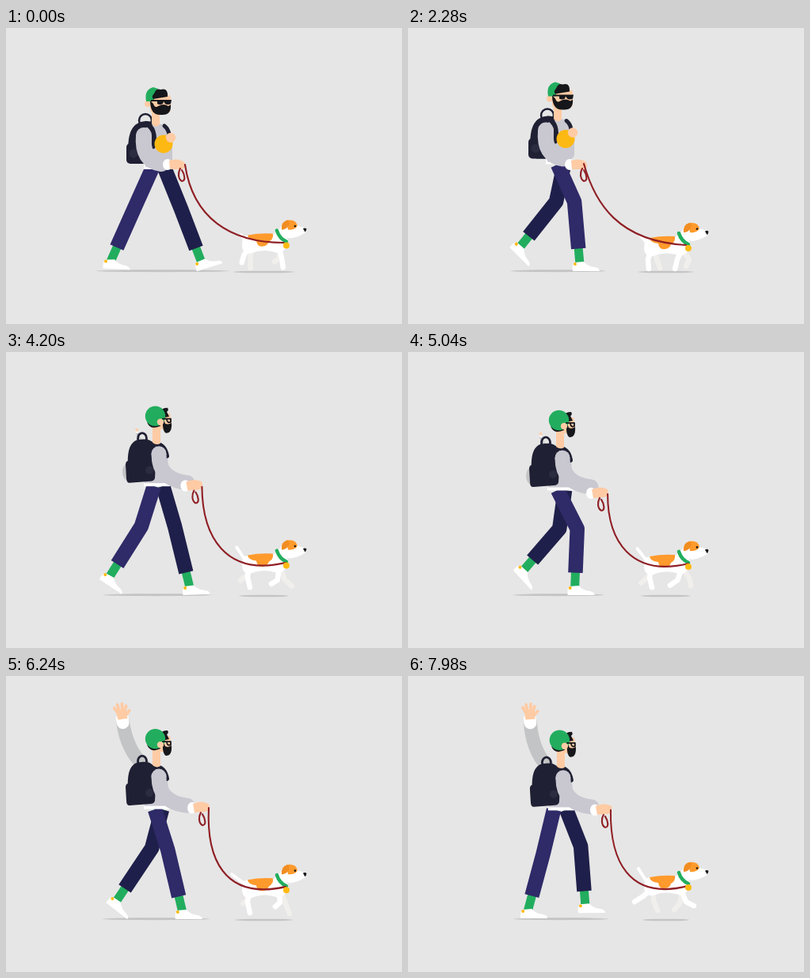
Recreate the animation shown at these times as an HTML page without scripts. Size 500 by 375 pixels, loop 8000 ms.

```html
<!DOCTYPE html>
<html lang="en">
<head>
<meta charset="utf-8">
<title>Walking the dog</title>
<style>
html, body { margin: 0; width: 100%; height: 100%; overflow: hidden; background: #e6e6e6; }
svg { display: block; width: 100%; height: 100%; }
.line { fill: none; stroke-linecap: round; stroke-linejoin: round; }
.sock { fill: none; stroke: #22ad5e; stroke-width: 11; }
.pants { fill: none; stroke-width: 18.5; stroke-linejoin: round; stroke-dasharray: .85 2; }
.leash { stroke: #8f1f25; stroke-width: 2.1; }
.paw { stroke: #fff; stroke-width: 6.5; }
.far { stroke: #f1efec; }
.skin { fill: #ffcba4; }
.dark { fill: #1f2033; }
.black { fill: #16171b; }
.green { fill: #22ad5e; }
.grey { fill: #c9c8d1; }
.sleeve { stroke: #c9c8d1; }
.strap { stroke: #1f2033; }
.orange { fill: #ff9a2c; }
.gold { fill: #fdb913; }
.white { fill: #fff; }
</style>
</head>
<body>
<svg viewBox="0 0 500 375">
<!-- master clock: every cycle restarts with it -->
<animate id="loop" attributeName="visibility" values="visible;visible" dur="8s" begin="0s;loop.end"/>
<defs>
  <path id="near" pathLength="1" d="M185 177L163 226 132 296">
    <animate attributeName="d" begin="loop.begin" dur="1.342s" repeatCount="indefinite"
      keyTimes="0;.149;.255;.394;.5;.548;.649;.699;.755;.894;.945;1"
      values="M185 177L163 226 132 296;M187 169L172 220 130 284;M187 175L181 226 139 276;M188 169L203 215 187 286;M188 177L212 229 240 297;M189 177L209 230 236 298;M188 169L204 220 223 299;M189 173L210 220 217 299;M189 175L214 224 211 299;M187 169L185 224 172 299;M184 169L171 225 152 298;M185 177L163 226 132 296"/>
  </path>
  <path id="off" pathLength="1" d="M200 177L221 229 247 297">
    <animate attributeName="d" begin="loop.begin" dur="1.342s" repeatCount="indefinite"
      keyTimes="0;.149;.255;.394;.5;.548;.649;.699;.755;.894;.945;1"
      values="M200 177L221 229 247 297;M198 169L212 220 230 299;M198 175L221 224 218 299;M198 169L193 224 180 299;M196 177L175 226 146 297;M196 177L180 226 146 297;M197 169L184 218 139 286;M197 173L187 220 141 278;M198 175L191 224 145 277;M200 169L211 215 193 286;M200 169L218 215 223 291;M200 177L221 229 247 297"/>
  </path>
  <g id="shoe">
    <path class="white" d="M-9 9Q-10 1-7-2L5-3Q10 3 19 4Q25 5 25 9Z"/>
    <circle class="gold" cx="-6" cy="0" r="2"/>
  </g>
  <g id="loopEnd">
    <path class="line leash" d="M-5 4C-8 9-8 17-3 20C2 20 1 12-3 6"/>
  </g>
</defs>

<!-- shadows -->
<ellipse cx="197.5" cy="307.7" rx="84.5" ry="1.5" fill="#c4c4c4">
  <animate attributeName="rx" begin="loop.begin" dur=".671s" repeatCount="indefinite"
    keyTimes="0;.096;.298;.398;.51;.788;.89;1" values="84.5;69.5;68.5;60.5;58;42;59;84.5"/>
  <animate attributeName="cx" begin="loop.begin" dur=".671s" repeatCount="indefinite"
    keyTimes="0;.096;.298;.398;.51;.788;.89;1" values="197.5;197.5;189.5;189.5;190;190;193;197.5"/>
</ellipse>
<ellipse cx="325.5" cy="309" rx="39" ry="1.3" fill="#c4c4c4">
  <animate attributeName="rx" begin="loop.begin" dur=".3975s" repeatCount="indefinite"
    keyTimes="0;.019;.077;.3;.604;.68;.7;.736;.9;1" values="39;37.5;29.5;37;30.5;31;37;35;37;39"/>
</ellipse>

<!-- legs -->
<g>
  <use href="#off" class="sock"/>
  <g>
    <animateTransform attributeName="transform" type="translate" begin="loop.begin" dur="1.342s" repeatCount="indefinite"
      keyTimes="0;.149;.255;.394;.5;.548;.649;.699;.755;.894;.945;1"
      values="247 297;230 299;218 299;180 299;146 297;146 297;139 286;141 278;145 277;193 286;223 291;247 297"/>
    <g>
      <animateTransform attributeName="transform" type="rotate" begin="loop.begin" dur="1.342s" repeatCount="indefinite"
        keyTimes="0;.149;.255;.394;.5;.548;.649;.699;.755;.894;.945;1" values="-18;0;0;0;3;4;38;45;48;10;0;-18"/>
      <use href="#shoe"/>
    </g>
  </g>
  <use href="#off" class="pants" stroke="#1f1f4b"/>
</g>
<g>
  <use href="#near" class="sock"/>
  <g>
    <animateTransform attributeName="transform" type="translate" begin="loop.begin" dur="1.342s" repeatCount="indefinite"
      keyTimes="0;.149;.255;.394;.5;.548;.649;.699;.755;.894;.945;1"
      values="132 296;130 284;139 276;187 286;240 297;236 298;223 299;217 299;211 299;172 299;152 298;132 296"/>
    <g>
      <animateTransform attributeName="transform" type="rotate" begin="loop.begin" dur="1.342s" repeatCount="indefinite"
        keyTimes="0;.149;.255;.394;.5;.548;.649;.699;.755;.894;.945;1" values="3;38;48;10;-18;-18;0;0;0;0;0;3"/>
      <use href="#shoe"/>
    </g>
  </g>
  <use href="#near" class="pants" stroke="#2f2a68"/>
</g>

<!-- dog -->
<g>
  <animateTransform attributeName="transform" type="translate" begin="loop.begin" dur=".3975s" repeatCount="indefinite"
    keyTimes="0;.019;.077;.2;.24;.45;.604;.68;.7;.736;.95;1"
    values="0 -4;0 0;0 -11;0 -7;0 0;0 0;0 -11;0 -7;0 -8;0 0;0 0;0 -4"/>
  <path class="line paw far" d="M310 281L309 294 309 308">
    <animate attributeName="d" begin="loop.begin" dur=".3975s" repeatCount="indefinite"
      keyTimes="0;.019;.077;.3;.604;.68;.7;.736;.9;1"
      values="M310 281L309 294 309 308;M310 281L305 293 307 305;M310 281L310 296 315 308;M310 281L309 294 318 305;M310 281L303 291 293 297;M310 281L303 292 294 300;M310 281L304 292 299 296;M310 281L314 292 318 304;M310 281L312 294 314 305;M310 281L309 294 309 308"/>
  </path>
  <path class="line paw far" d="M347 281L343 296 337 300">
    <animate attributeName="d" begin="loop.begin" dur=".3975s" repeatCount="indefinite"
      keyTimes="0;.019;.077;.3;.604;.68;.7;.736;.9;1"
      values="M347 281L343 296 337 300;M347 281L355 290 352 298;M347 281L343 299 336 307;M347 281L340 294 337 305;M347 281L353 297 364 305;M347 281L356 295 357 303;M347 281L353 296 358 309;M347 281L355 293 351 302;M347 281L354 292 350 300;M347 281L343 296 337 300"/>
  </path>
  <path class="line" stroke="#fff" stroke-width="4" d="M301 271L297 266">
    <animate attributeName="d" begin="loop.begin" dur=".3975s" repeatCount="indefinite"
      keyTimes="0;.019;.077;.3;.604;.68;.7;.736;1"
      values="M301 271L297 266;M301 271L294 264;M301 271L291 255;M301 271L294 263;M301 271L291 255;M301 271L290 256;M301 271L285 259;M301 271L294 264;M301 271L297 266"/>
  </path>
  <path class="white" d="M299 268Q312 263 338 265L346 257Q353 262 356 272Q355 286 344 289Q329 283 315 287Q300 294 298 280Z"/>
  <path class="line paw" d="M307 281L300 291 297 300">
    <animate attributeName="d" begin="loop.begin" dur=".3975s" repeatCount="indefinite"
      keyTimes="0;.019;.077;.3;.604;.68;.7;.736;.9;1"
      values="M307 281L300 291 297 300;M307 281L303 292 303 305;M307 281L297 290 286 297;M307 281L305 292 300 304;M307 281L305 294 309 307;M307 281L305 293 308 305;M307 281L305 294 308 308;M307 281L303 293 304 305;M307 281L302 293 300 304;M307 281L300 291 297 300"/>
  </path>
  <path class="line paw" d="M345 282L349 296 351 309">
    <animate attributeName="d" begin="loop.begin" dur=".3975s" repeatCount="indefinite"
      keyTimes="0;.019;.077;.3;.604;.68;.7;.736;.9;1"
      values="M345 282L349 296 351 307;M345 282L343 294 342 305;M345 282L351 297 361 302;M345 282L348 294 350 305;M345 282L342 298 333 302;M345 282L340 296 330 303;M345 282L346 295 340 300;M345 282L340 293 337 305;M345 282L343 294 344 305;M345 282L349 296 351 307"/>
  </path>
  <path class="orange" d="M305 266Q320 263 337 264Q338 271 332 274Q330 281 321 280Q317 279 316 273Q306 272 305 266Z"/>
  <path class="white" d="M345 264Q346 250 356 247Q365 246 368 254L378 257Q381 261 376 264Q368 269 358 270Z"/>
  <path class="orange" d="M354 247Q366 245 368 254Q365 260 356 259Z"/>
  <path fill="#f18d22" d="M348 259Q347 249 355 247Q360 249 356 255Q353 259 348 259Z"/>
  <circle cx="365" cy="254.500" r="1.300" class="black"/>
  <path class="black" d="M375 257.500Q378 256 379.500 258Q379 261 377.500 262Z"/>
  <path class="line" stroke="#22ad5e" stroke-width="4.500" d="M342 260Q345 270 354 274"/>
</g>

<!-- turned towards us -->
<g>
  <animate attributeName="visibility" values="visible;hidden" keyTimes="0;.356" calcMode="discrete" dur="8s" repeatCount="indefinite"/>
  <g>
    <animateTransform attributeName="transform" type="translate" begin="loop.begin" dur=".671s" repeatCount="indefinite"
      keyTimes="0;.096;.298;.398;.51;.788;.89;1" values="0 0;0 -1;0 -10;0 -6.5;2 -3;3 -8;3 -8.5;0 0"/>
    <circle cx="176" cy="117" r="8" class="line strap" stroke-width="2.500"/>
    <path class="dark" d="M155 165C152 135 158 118 178 118Q190 118 189 128L182 172H162Z"/>
    <rect x="152" y="146" width="26" height="26" rx="5" class="dark"/>
    <circle cx="161" cy="159" r="5.500" fill="#2b2c40"/>
    <rect x="174" y="172" width="26" height="7" class="white"/>
    <path class="grey" d="M174 128Q184 121 200 122Q211 130 210 148L210 168Q206 178 176 176Z"/>
    <path class="line strap" stroke-width="5" d="M200 124Q205 128 206 135"/>
    <path class="line strap" stroke-width="6" d="M177 121Q190 128 186 150"/>
    <circle cx="199" cy="147" r="11.500" class="gold"/>
    <path class="line sleeve" stroke-width="20" d="M174 136C172 158 180 170 196 172"/>
    <circle cx="208" cy="139" r="6.200" class="skin"/>
    <path class="skin" d="M184 104H194V122Q190 127 184 122Z"/>
    <circle cx="179" cy="96" r="4" class="skin"/>
    <rect x="182" y="85" width="26" height="22" rx="4" class="skin"/>
    <path class="green" d="M177 93Q174 78 186 75L192 77L186 93Z"/>
    <path class="black" d="M187 83Q190 76 195 78Q205 75 204 87L186 90Q183 87 187 83Z"/>
    <path class="black" d="M182 92L186 96Q188 102 192 99Q199 95 205 99L208 97Q209 111 196 110Q182 111 182 92Z"/>
    <path class="black" d="M183 91H209L208 96Q204 98 201 96L199 93L198 96Q194 98 191 96V93H183Z"/>
  </g>
  <ellipse cx="204" cy="173" rx="6" ry="7" class="white"/>
  <path class="skin" d="M206 168Q217 164 225 170Q228 177 222 179L207 179Z"/>
  <use href="#loopEnd" x="225" y="174"/>
  <path class="line leash" d="M226 173C236 240 282 272 351 272">
    <animate attributeName="d" dur="8s" repeatCount="indefinite" keyTimes="0;.15;.29;.356;1"
      values="M226 173C236 240 282 272 351 272;M222 172C236 222 265 270 351 276;M222 172C236 222 265 270 351 275;M232 172C239 225 270 274 352 271;M232 172C239 225 270 274 352 271"/>
  </path>
</g>

<!-- turned away -->
<g visibility="hidden">
  <animate attributeName="visibility" values="hidden;visible" keyTimes="0;.356" calcMode="discrete" dur="8s" repeatCount="indefinite"/>
  <g>
    <animateTransform attributeName="transform" type="translate" begin="loop.begin" dur=".671s" repeatCount="indefinite"
      keyTimes="0;.096;.298;.398;.51;.788;.89;1" values="0 0;0 -1;0 -10;0 -6.5;2 -3;3 -8;3 -8.5;0 0"/>
    <!-- waving arm -->
    <g transform="translate(170 120)">
      <g>
        <animateTransform attributeName="transform" type="scale" dur="8s" repeatCount="indefinite"
          keyTimes="0;.68;.74;1" values=".2;.2;1;1" calcMode="spline" keySplines="0 0 1 1;.3 0 .3 1;0 0 1 1"/>
        <g>
          <animateTransform attributeName="transform" type="rotate" begin="loop.begin" dur=".7s" repeatCount="indefinite"
            values="-3;2;-3" calcMode="spline" keySplines=".4 0 .6 1;.4 0 .6 1"/>
          <path class="line" stroke="#c3c4c5" stroke-width="17" stroke-linecap="butt" d="M4 4Q-17-18-20-53"/>
          <path class="line" stroke="#fff" stroke-width="16" stroke-linecap="butt" d="M-20-52L-20.500-57"/>
          <path class="skin" d="M-26-56L-28-66Q-22-71-15-67L-14-57Z"/>
          <path class="line" stroke="#ffcba4" stroke-width="3.800" d="M-26-65L-30-71M-24-67L-26-75M-20-67L-20-76M-17-66L-15-73M-16-61L-11-67"/>
        </g>
      </g>
    </g>
    <ellipse cx="154" cy="160" rx="7" ry="11" fill="#c3c4c5">
      <animate attributeName="rx" dur="8s" repeatCount="indefinite" keyTimes="0;.66;.7;1" values="7;7;0;0"/>
    </ellipse>
    <path class="grey" d="M175 128Q188 121 203 130L207 177H175Z"/>
    <rect x="174" y="174.500" width="33" height="4" class="white"/>
    <ellipse cx="172" cy="118" rx="5.500" ry="7" class="line strap" stroke-width="2.800"/>
    <path class="line strap" stroke-width="6" d="M184 125Q200 123 203 140"/>
    <path class="dark" d="M154 152C153 132 157 119 171 119Q186 117 190 132L188 168Q187 172 182 172L156 174Q152 174 152 168L151 151Q151 147 154 146Z"/>
    <circle cx="181" cy="158" r="5" fill="#2b2c40"/>
    <path class="line sleeve" stroke-width="19" stroke-linecap="butt" d="M193 138C193 157 202 171 229 174"/>
    <circle cx="193" cy="137" r="9.500" class="grey"/>
    <path class="skin" d="M185 102H195V124Q190 127 185 123Z"/>
    <path class="skin" d="M192 86H207L209 98L204 106H192Z"/>
    <path class="black" d="M195 84Q196 79 204 79Q206 82 203 84L206 90L197 92Z"/>
    <path class="black" d="M178 97Q182 100 194 96L195 102Q182 108 178 97Z"/>
    <path class="black" d="M198 92L201 99Q205 101 209 98Q210 111 202 111Q197 109 198 92Z"/>
    <circle cx="188.500" cy="89.500" r="12.700" class="green"/>
    <circle cx="195" cy="97" r="4.200" class="skin"/>
    <path class="line" stroke="#16171b" stroke-width="1.800" d="M198 93H208V97Q204 99 203 94"/>
    <g>
      <animateTransform attributeName="transform" type="translate" dur="8s" repeatCount="indefinite"
        keyTimes="0;.356;.4275;.63;.78;1" values="-20 -4;-20 -4;-9 -4;-4 4;2 -1;0 0"/>
      <ellipse cx="233" cy="178" rx="6" ry="7.300" class="white"/>
      <path class="skin" d="M234 173Q245 168 254 173Q256 181 250 183L236 184Z"/>
      <use href="#loopEnd" x="249" y="180"/>
    </g>
  </g>
  <g transform="translate(354 267)">
    <g>
      <animateTransform attributeName="transform" type="scale" begin="loop.begin" dur=".671s" repeatCount="indefinite"
        keyTimes="0;.096;.298;.398;.51;.788;.89;1" values="1 1;1 1.01;1 1.11;1 1.07;.98 1.035;.97 1.09;.97 1.095;1 1"/>
      <path class="line leash" d="M-109-92C-108-35-81 15-1-1" >
        <animate attributeName="d" dur="8s" repeatCount="indefinite" keyTimes="0;.356;.4275;.63;.78;1"
          values="M-120-92C-116-38-84 10-1 3;M-120-92C-116-38-84 10-1 3;M-109-92C-108-35-81 15-1-1;M-104-84C-104-27-74 18 0 1;M-98-90C-101-34-80 16-1 0;M-101-89C-102-32-79 17 0-1"/>
      </path>
    </g>
  </g>
</g>

<!-- collar tag, in front of the leash -->
<g>
  <animateTransform attributeName="transform" type="translate" begin="loop.begin" dur=".3975s" repeatCount="indefinite"
    keyTimes="0;.019;.077;.2;.24;.45;.604;.68;.7;.736;.95;1"
    values="0 -4;0 0;0 -11;0 -7;0 0;0 0;0 -11;0 -7;0 -8;0 0;0 0;0 -4"/>
  <circle cx="354" cy="279" r="4" class="gold"/>
</g>
</svg>
</body>
</html>
```
